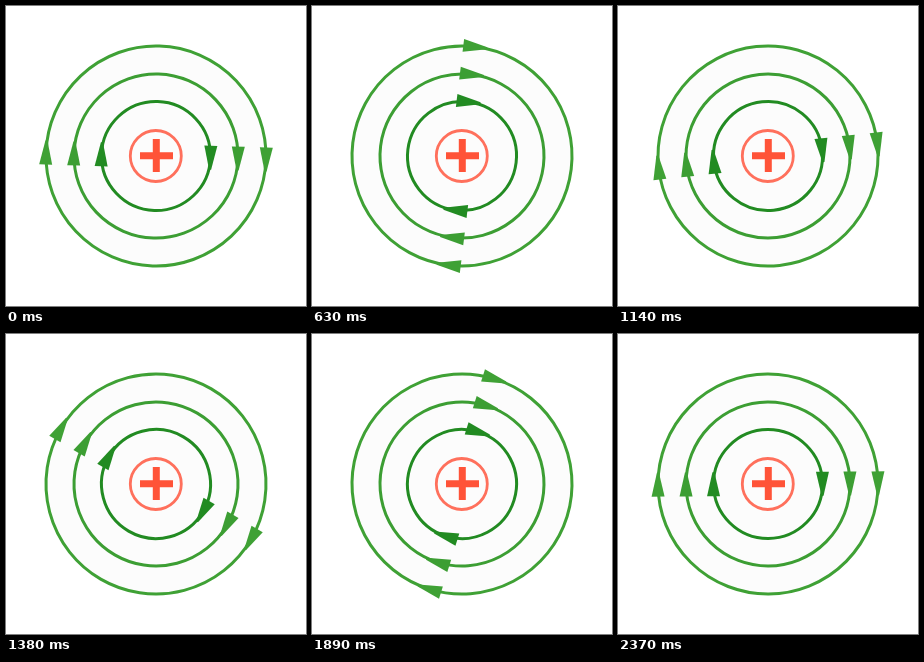
An HTML page for the animation above (2.4 s loop, 300 by 300 pixels).

```html
<!DOCTYPE html>
<html lang="en">
<head>
<meta charset="utf-8">
<title>Field lines around a positive current</title>
<style>
  html, body { margin: 0; height: 100%; overflow: hidden; background: #fff; }
  svg { display: block; width: 100%; height: 100%; }
</style>
</head>
<body>
<svg viewBox="-150 -150 300 300">
  <circle r="110" fill="#fcfcfc"/>
  <g id="field"></g>
  <circle r="25.5" cx="-.2" fill="none" stroke="#ff705c" stroke-width="2.8"/>
  <path d="M-16 -.2H17M.3 -17V16" stroke="#ff5338" stroke-width="7"/>
</svg>
<script>
  const LOOP = 2400, STEP = 30, START_ANGLE = 271.8, STEP_ANGLE = 4.53;
  const rings = [[110, '#3fa135'], [82, '#3c9e33'], [54.5, '#228b22']];
  const field = document.getElementById('field');

  const arrow = (r, turn) =>
    `<path d="M-12 ${-r - 6.5}L12 ${-r - 1}V${-r + 1}L-12 ${-r + 6.5}Z" transform="rotate(${turn})"/>`;

  field.innerHTML = rings.map(([r, color]) =>
    `<g fill="${color}"><circle r="${r}" fill="none" stroke="${color}" stroke-width="3"/>` +
    arrow(r, 0) + arrow(r, 180) + '</g>').join('');

  const start = performance.now();
  function draw() {
    const time = Math.max(0, performance.now() - start) % LOOP;
    const angle = START_ANGLE + Math.floor(time / STEP) * STEP_ANGLE;
    field.setAttribute('transform', `rotate(${angle})`);
    requestAnimationFrame(draw);
  }
  draw();
</script>
</body>
</html>
```
